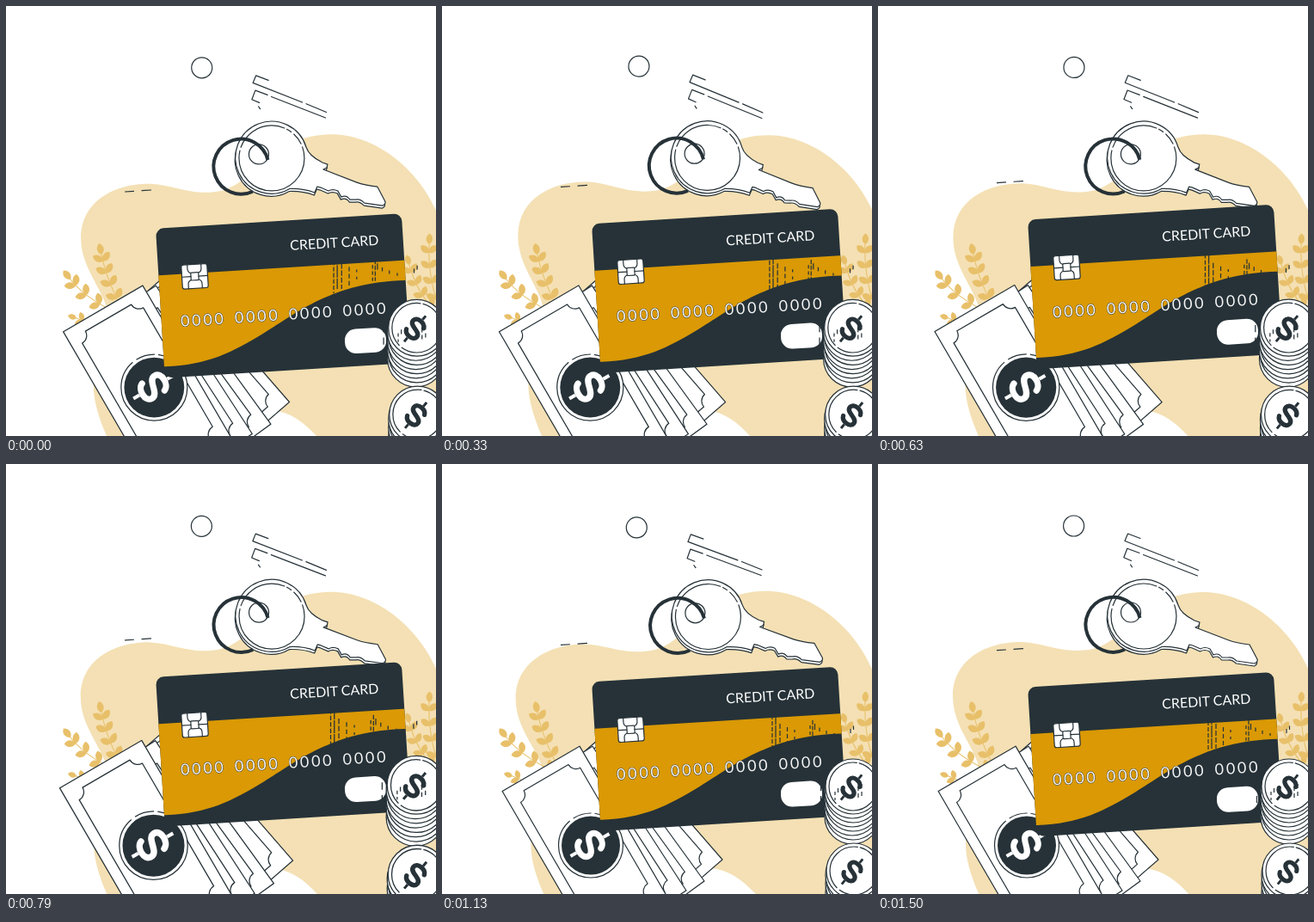
An HTML page that plays this animation: 500x500 px, repeating every 1540 ms.

```html
<!DOCTYPE html>
<html lang="en">
<head>
<meta charset="utf-8">
<title>Card, key and cash</title>
<style>
html, body { margin: 0; width: 100%; height: 100%; overflow: hidden; background: #fff; }
svg { display: block; width: 100vw; height: 100vh; }
.line { fill: none; stroke: #263238; stroke-width: 1.2; stroke-linecap: round; stroke-linejoin: round; }
.paper { fill: #fff; stroke: #263238; stroke-width: 1.2; stroke-linejoin: round; }
.dark { fill: #263238; }
.leaf { fill: #e8c06a; }
.stem { fill: none; stroke: #e8c06a; stroke-width: 1.1; }
text { font-family: Lato, "Open Sans", sans-serif; fill: #fff; }
.digits { font-size: 18px; letter-spacing: 2.7px; stroke: #263238; stroke-width: .8; paint-order: stroke; fill: #f2f2f2; }
</style>
</head>
<body>
<svg viewBox="0 0 500 500" xmlns="http://www.w3.org/2000/svg">
  <defs>
    <clipPath id="cardShape">
      <rect width="286.4" height="174" rx="9" transform="translate(174 259.6) rotate(-3.55)"/>
    </clipPath>
    <g id="dollar" fill="none" stroke-linecap="round">
      <path d="M7.5-7C5-13-8-13-8-6C-8 2 8-2 8 6C8 13-5 13-7.5 7" stroke-width="5.4"/>
      <path d="M0-20V-14M0 14V20" stroke-width="3" stroke-linecap="butt"/>
    </g>
    <path id="keyShape" d="M330 212.5A42 42 0 1 1 349 164Q352 174 368 182L374 184L373 188L369 190L408 205Q416 208 432 210L441 227Q442 230 438 232L417 229Q412 224 407 225L400 225Q396 219 390 222L386 215Q380 212 375 215L366 211L362 210L359 217Q346 212 330 212.5Z"/>
  </defs>

  <path id="blob" fill="#f4e0b4" d="M87 270C87 225 130 206 168 207C195 208 215 222 250 215C290 205 310 149 378 149C430 149 480 190 501 240L550 330V560H410C370 512 350 474 310 470H250L200 560H150C115 505 101 465 102 440C103 410 125 370 115 345C105 320 87 300 87 270Z"/>
  <g id="plants"></g>
  <path id="dashes" class="line" d="M138.500 216.700L148.500 216M158 215.300L168.500 214.700" stroke-width="1.5"/>

  <g id="key">
    <circle class="line" cx="227.600" cy="72" r="12"/>
    <path class="line" d="M305 86.500L290.500 81L287 89.500L344.500 112M349 113.700L372.500 123.500M304 103.500L289.800 98.200L285.800 108.800L294.500 112.500M308.500 105.500L371.500 130M293.500 117L295.500 119.800"/>
    <use href="#keyShape" class="paper" x="-.5" y="3"/>
    <use href="#keyShape" class="paper"/>
    <circle class="line" cx="309" cy="177" r="38" stroke-dasharray="128 4 62 3 6 4 14 4 14 0"/>
    <circle class="line" cx="294" cy="172.500" r="11.500"/>
    <path class="line" d="M304.500 179A32 32 0 1 0 287 215.800" style="stroke-width:4;stroke-linecap:butt"/>
  </g>

  <g id="bills"></g>

  <g id="card">
    <g clip-path="url(#cardShape)">
      <rect class="dark" x="160" y="230" width="330" height="220"/>
      <path fill="#da9905" d="M170 314.500L470 296V319.800H464C380 322 338 358 300 381C262 404 235 418 185 420H170Z"/>
    </g>
    <text font-size="16" transform="translate(330.500 284.800) rotate(-3.55)">CREDIT CARD</text>
    <g id="digits" class="digits" transform="translate(203.500 373.500) rotate(-3.65)"></g>
    <g transform="translate(219.500 315) rotate(-3.55)">
      <rect class="paper" x="-15" y="-14" width="30" height="28" rx="2.500"/>
      <rect class="line" x="-4.500" y="-4.500" width="9" height="9" rx="1"/>
      <path class="line" d="M-8-14V-9Q-8-5-4.500-4M8-14V-9Q8-5 4.500-4M-8 14V9Q-8 5-4.500 4M8 14V9Q8 5 4.500 4M-15 0H-4.500M4.500 0H15"/>
    </g>
    <rect x="-24" y="-14.300" width="48" height="28.600" rx="13" fill="#fff" transform="translate(418 389.800) rotate(-3.55)"/>
  </g>

  <g id="coins"></g>
</svg>
<script>
const LOOP = 1540, STEPS = 37;
const $ = id => document.getElementById(id);
const put = (id, html) => { $(id).innerHTML = html; };

function leaf(x, y, angle, size) {
  return `<path class="leaf" transform="translate(${x} ${y}) rotate(${angle}) scale(${size})" d="M0 0C3 -5 10 -6 14 0C10 6 3 5 0 0Z"/>`;
}

// Leaves in pairs along a curved stem, from base to tip.
function plant([bx, by], [cx, cy], [tx, ty], pairs, size) {
  let out = `<path class="stem" d="M${bx} ${by}Q${cx} ${cy} ${tx} ${ty}"/>`;
  for (let i = 1; i <= pairs; i++) {
    const t = i / (pairs + 0.6), u = 1 - t;
    const x = u * u * bx + 2 * u * t * cx + t * t * tx;
    const y = u * u * by + 2 * u * t * cy + t * t * ty;
    const a = Math.atan2(u * (cy - by) + t * (ty - cy), u * (cx - bx) + t * (tx - cx)) * 180 / Math.PI;
    out += leaf(x, y, a - 48, size) + leaf(x, y, a + 48, size);
  }
  const end = Math.atan2(ty - cy, tx - cx) * 180 / Math.PI;
  return out + leaf(tx, ty, end, size);
}

put('plants',
  plant([146, 372], [118, 325], [111, 289], 5, 0.95) +
  plant([150, 366], [96, 345], [75, 318], 4, 0.95) +
  plant([115, 385], [98, 368], [82, 363], 2, 0.75) +
  plant([506, 360], [490, 315], [492, 277], 4, 0.9) +
  plant([505, 362], [478, 335], [469, 301], 4, 0.85));

// A note hung from its lower right corner.
function bill(x, y, angle) {
  return `<g transform="translate(${x} ${y}) rotate(${angle})">
    <rect class="paper" x="-104" y="-200" width="104" height="200"/>
    <path class="line" d="M-82 -188H-22A10 10 0 0 0 -12 -178V-22A10 10 0 0 0 -22 -12H-82A10 10 0 0 0 -92 -22V-178A10 10 0 0 0 -82 -188Z"/></g>`;
}

put('bills',
  bill(326, 460, -41) + bill(305, 485, -36) + bill(284, 496, -33) + bill(260.6, 501, -30.2) +
  `<circle class="paper" cx="173" cy="443.500" r="37.500" stroke-dasharray="150 5 22 4"/>
   <circle class="dark" cx="173" cy="443.500" r="34"/>
   <use href="#dollar" stroke="#fff" transform="translate(172 443) rotate(60) scale(1.3)"/>`);

put('digits', [0, 63, 126, 189].map(x => `<text class="digits" x="${x}">0000</text>`).join(''));

function stack(x, y, count) {
  let out = '';
  for (let i = count; i >= 0; i--)
    out += `<circle class="paper" cx="${x - (i % 2)}" cy="${y + i * 5}" r="32"/>`;
  return out + `<circle class="line" cx="${x}" cy="${y}" r="28" stroke-dasharray="62 4 70 3"/>
    <use href="#dollar" stroke="#263238" transform="translate(${x - 2} ${y + 1}) rotate(40) scale(.95)"/>`;
}

// Upright strokes: x, top, bottom, dash pattern.
const strokes = [
  [384, 285, 336, '5 2'], [388, 289, 331, '14 1'], [393, 302, 331, '6 2'],
  [401.5, 306, 328, '5 3'], [410, 309, 323, '3 5'], [428, 304, 322, '4 3'],
  [431, 298, 322, '5 1.5'], [433.5, 302, 309, '7 1'], [439, 306.5, 311, '5 1'],
  [447, 310, 314, '5 1'], [456, 313, 316, '5 1'], [475, 308, 313, '6 1'],
  [478.5, 304.5, 309, '6 1'], [440.5, 372, 404, '8 6'], [457, 381, 391, '4 3'],
  [460.5, 377, 382, '5 1'], [484, 375, 389, '5 3'], [488, 372, 388, '5 4']
];
put('coins', stack(478, 375, 7) + stack(479, 473, 7) +
  strokes.map(([x, a, b, d]) =>
    `<path class="line" style="stroke-linecap:butt" d="M${x} ${a}V${b}" stroke-dasharray="${d}"/>`).join(''));

// Piecewise linear value through [position, value] points.
function ramp(keys, p) {
  let i = 1;
  while (p > keys[i][0]) i++;
  const [a, v] = keys[i - 1], [b, w] = keys[i];
  return v + (w - v) * (p - a) / (b - a);
}
const FLOAT = [[0, 0], [.5, -12.8], [1, 0]];
const SWAY = [[0, 0], [.25, 1], [.75, -1], [1, 0]];
const BEAT = [[0, 1], [.1, 1.1], [.3, 1], [.4, 1], [.5, 1.1], [.6, 1], [1, 1]];

const move = (id, value) => $(id).setAttribute('transform', value);
const grow = (x, y, s) => `translate(${x} ${y}) scale(${s}) translate(${-x} ${-y})`;

function draw(ms) {
  const step = Math.floor((ms % LOOP + 2) * STEPS / LOOP);
  const p = (step + 1) % STEPS / STEPS;
  const rise = `translate(0 ${ramp(FLOAT, p)})`, sway = ramp(SWAY, p), beat = ramp(BEAT, p);
  move('card', rise);
  move('dashes', rise);
  move('blob', `rotate(${sway} 310 350)`);
  move('key', `rotate(${sway} 340 150)`);
  move('bills', grow(198, 441, beat));
  move('coins', grow(493, 403, beat));
}

const start = performance.now();
function tick() {
  draw(performance.now() - start);
  requestAnimationFrame(tick);
}
tick();
</script>
</body>
</html>
```
